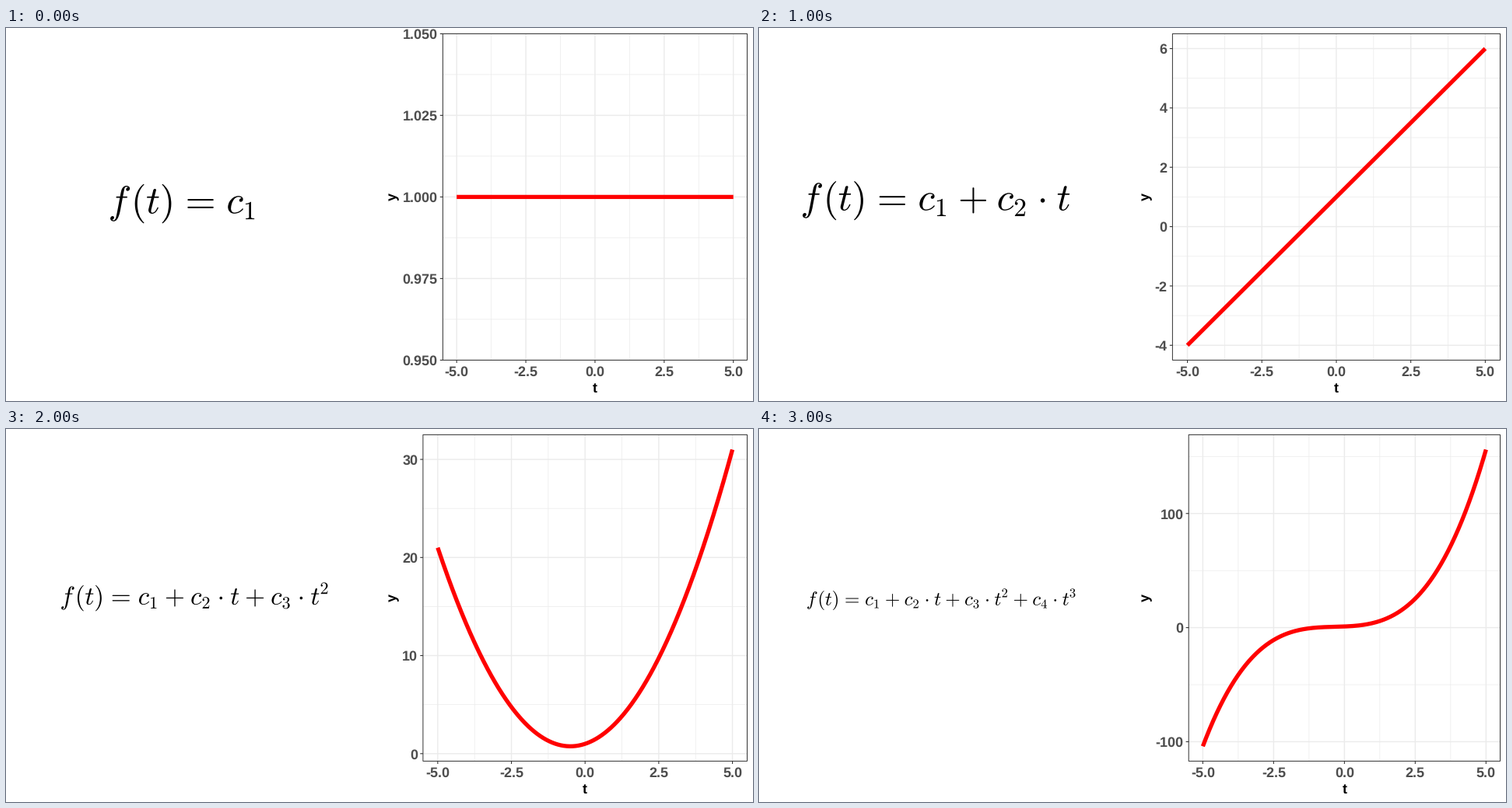
Write a matplotlib script that moves like this. It is 960 by 480 pixels and loops after 4000 ms.

```python
import numpy as np
import matplotlib.pyplot as plt
from matplotlib.animation import FuncAnimation
from matplotlib.patches import PathPatch, Rectangle
from matplotlib.path import Path
from matplotlib.textpath import TextPath

W, H, DPI = 960, 480, 100
PT = 72 / DPI  # points per pixel
TOP, BOTTOM, RIGHT = 7.4, 427.4, 952.5
RED, INK, LABEL, GRID = "#FF0000", "#333333", "#4D4D4D", "#EBEBEB"

plt.rcParams.update({
    "font.family": "Liberation Sans",
    "mathtext.fontset": "cm",
    "text.hinting": "none",
    "path.snap": False,
})

# symbol: (TeX, space before, advance), all in em
SYMBOLS = {
    "f": ("f", 0, .584), "(": ("(", 0, .381), ")": (")", 0, .381),
    "t": ("t", 0, .354), "c": ("c", 0, .4235),
    # mathtext pads a relation by itself, so its lead is shorter
    "=": ("=", .278 - .1756 - .008, 1.318),
    "+": ("+", .222 - .008, 1.206),
    ".": (r"\cdot", .222, .722),
}
TERMS = ["c1", "c2.t", "c3.t2", "c4.t3"]

# panel left, y ticks, tick format, em size, formula x, formula baseline
SCENES = [
    (561.4, np.linspace(.95, 1.05, 5), "%.3f", 50.3, 131.4, 238.7),
    (531.4, np.arange(-4, 7, 2), "%d", 50.0, 53.4, 234.7),
    (535.9, np.arange(0, 31, 10), "%d", 33.25, 69.3, 226.0),
    (552.2, np.arange(-100, 101, 100), "%d", 24.95, 60.8, 226.8),
]

fig = plt.figure(figsize=(W / DPI, H / DPI), dpi=DPI, facecolor="white")
ax = fig.add_axes([0, 0, 1, 1])


def glyph(tex, x, y, size):
    path = TextPath((0, 0), f"${tex}$", size=size)
    outline = Path(path.vertices * [1, -1] + [x, y], path.codes)
    ax.add_patch(PathPatch(outline, fc="black", lw=0))


def formula(text, x, y, em):
    previous = ""
    for ch in text:
        if ch.isdigit():
            shift = .15 if previous == "c" else -.413
            glyph(ch, x + .01 * em, y + shift * em, .667 * em)
            x += .396 * em
        else:
            tex, lead, advance = SYMBOLS[ch]
            glyph(tex, x + lead * em, y, em)
            x += advance * em
        previous = ch


def line(x, y, color, width, z):
    ax.plot(x, y, color=color, lw=width * PT, zorder=z,
            solid_capstyle="butt", solid_joinstyle="round")


def label(x, y, text, ha="center", color=LABEL, **kw):
    ax.text(x, y, text, ha=ha, va="baseline", color=color,
            size=18 * PT, weight="bold", **kw)


def midpoints(ticks, lo, hi):
    step = ticks[1] - ticks[0]
    mids = np.append(ticks - step / 2, ticks[-1] + step / 2)
    return mids[(mids > lo) & (mids < hi)]


def expand(lo, hi):
    pad = .05 * (hi - lo)
    return lo - pad, hi + pad


def draw(i):
    left, y_ticks, fmt, em, fx, fy = SCENES[i]
    ax.cla()
    ax.set(xlim=(0, W), ylim=(H, 0))
    ax.axis("off")

    t = np.linspace(-5, 5, 401)
    y = np.polyval(np.ones(i + 1), t)
    t_lo, t_hi = expand(-5, 5)
    y_lo, y_hi = expand(y.min(), y.max()) if i else (.95, 1.05)

    def px(v):
        return left + (v - t_lo) / (t_hi - t_lo) * (RIGHT - left)

    def py(v):
        return BOTTOM - (v - y_lo) / (y_hi - y_lo) * (BOTTOM - TOP)

    t_ticks = np.linspace(-5, 5, 5)
    for xs, ys, width in (
            (midpoints(t_ticks, t_lo, t_hi), midpoints(y_ticks, y_lo, y_hi), .7),
            (t_ticks, y_ticks, 1.4)):
        for v in xs:
            line([px(v)] * 2, [TOP, BOTTOM], GRID, width, 1)
        for v in ys:
            line([left, RIGHT], [py(v)] * 2, GRID, width, 1)

    line(px(t), py(y), RED, 5.3, 2)
    ax.add_patch(Rectangle((left, TOP), RIGHT - left, BOTTOM - TOP,
                           fill=False, ec=INK, lw=1.0 * PT, zorder=3))

    for v in t_ticks:
        line([px(v)] * 2, [BOTTOM, BOTTOM + 3.6], INK, 1.1, 3)
        label(px(v), 447.8, f"{v:.1f}")
    for v in y_ticks:
        line([left - 3.6, left], [py(v)] * 2, INK, 1.1, 3)
        label(left - 6.7, py(v) + 6.6, fmt % v, ha="right")

    middle = (left + RIGHT) / 2
    label(middle, 469.3, "t", color="black")
    ax.text(501.5, (TOP + BOTTOM) / 2, "y", rotation=90, ha="right",
            va="center", rotation_mode="default", color="black",
            size=18 * PT, weight="bold").set_x(506)

    formula("f(t)=" + "+".join(TERMS[:i + 1]), fx, fy, em)
    return []


animation = FuncAnimation(fig, draw, frames=len(SCENES), interval=1000,
                          repeat=True)
plt.show()
```
